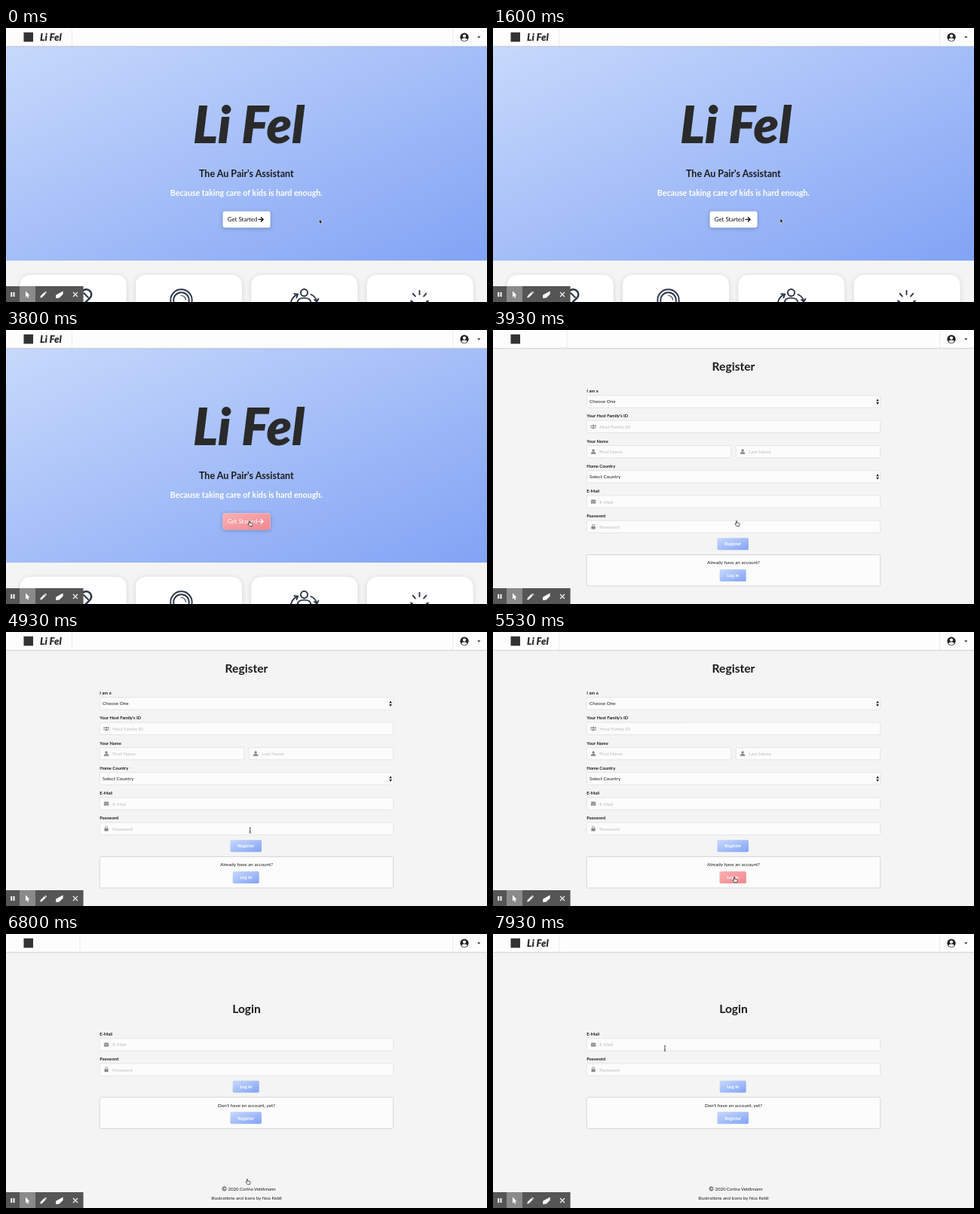
Recreate the animation shown at these times as an HTML page. Size 638 px wide and 364 px high, loop 8 s.

```html
<!DOCTYPE html>
<html lang="en">
<head>
<meta charset="utf-8">
<title>Sign-in walkthrough</title>
<style>
html, body { margin: 0; width: 100%; height: 100%; overflow: hidden; background: #f4f4f4; }
svg { display: block; width: 100%; height: 100%; }
text { font-family: Lato, sans-serif; fill: #1b1c1d; }
.b { font-weight: 700; }
.mid { text-anchor: middle; }
.brand { font-weight: 900; font-style: italic; fill: #2a2a2a; }
.hint { fill: #bcbcbc; }
.white { fill: #fff; }
.field { fill: #fcfcfc; stroke: #dadada; stroke-width: .6; }
.icon { fill: #888; }
.line { fill: none; stroke: #2d3748; stroke-width: 1.9; stroke-linecap: round; stroke-linejoin: round; }
.shadow { filter: drop-shadow(0 1.5px 2.5px #0004); }
.card { filter: drop-shadow(0 1px 3px #0002); }
.edge { filter: drop-shadow(0 .5px 1px #0002); }
</style>
</head>
<body>
<svg id="stage" viewBox="0 0 638 364" preserveAspectRatio="none"></svg>
<script>
const $ = id => document.getElementById(id);
const text = (x, y, size, str, cls = '') =>
  `<text x="${x}" y="${y}" font-size="${size}" class="${cls}">${str}</text>`;
const rect = (x, y, w, h, attrs = '') =>
  `<rect x="${x}" y="${y}" width="${w}" height="${h}" ${attrs}/>`;
const path = (d, attrs = '') => `<path d="${d}" ${attrs}/>`;
const group = (id, body, attrs = '') => `<g ${id && `id="${id}"`} ${attrs}>${body}</g>`;
const gradient = (id, from, to) =>
  `<linearGradient id="${id}" x2="1" y2="1"><stop stop-color="${from}"/><stop offset="1" stop-color="${to}"/></linearGradient>`;

const icons = {
  user: '<circle cy="-1.6" r="1.8"/><path d="M-3.2 3.2V2Q-3 .3-1 .3H1Q3 .3 3.2 2V3.2Z"/>',
  users: '<circle cy="-1.2" r="1.4"/><circle cx="-2.8" cy="-1.2" r="1"/><circle cx="2.8" cy="-1.2" r="1"/>' +
    '<path d="M-2 2.6Q-2 .6 0 .6T2 2.6ZM-4.2 1.8Q-4.2.2-2.2.3L-2.6 1.8ZM4.2 1.8Q4.2.2 2.2.3L2.6 1.8Z"/>',
  mail: '<rect x="-3.2" y="-2.5" width="6.4" height="5" rx=".6"/><path d="M-3.2-1.5 0 .8 3.2-1.5" fill="none" stroke="#fcfcfc" stroke-width=".6"/>',
  lock: '<rect x="-2.6" y="-.6" width="5.2" height="3.8" rx=".5"/><path d="M-1.5-.6V-1.6a1.5 1.5 0 0 1 3 0V-.6" fill="none" stroke="#888" stroke-width=".9"/>'
};

function input(x, y, w, hint, icon) {
  return rect(x, y, w, 16.2, 'rx="1.8" class="field"') +
    `<g class="icon" transform="translate(${x + 8.8} ${y + 8.1})">${icons[icon]}</g>` +
    text(x + 17, y + 10.5, 6.35, hint, 'hint');
}

function select(y, value) {
  return rect(124.3, y, 389.4, 16.2, 'rx="1.8" class="field"') +
    text(128, y + 10.4, 6.35, value) +
    path(`M508.2 ${y + 7.4}l1.9-2.9 1.9 2.9zm0 1.6h3.8l-1.9 2.9z`, 'fill="#222"');
}

const label = (y, str) => text(124.3, y, 5.8, str, 'b');

// A named button also gets a hover layer
function button(y, w, str, id) {
  const box = fill => rect(318.2 - w / 2, y, w, 16, `rx="1.8" fill="url(#${fill})"`);
  return box('blue') + (id ? group(id, box('pink')) : '') +
    text(318.2, y + 10.2, 6, str, 'b mid white');
}

const panel = (y, str) => rect(124.3, y, 389.4, 41.5, 'rx="2" fill="#fcfcfc" stroke="#c9c9ca" stroke-width=".7"') +
  text(319, y + 12.7, 6.3, str, 'mid');

function startButton(fill, color) {
  return rect(287.6, 243.6, 63, 21.7, `rx="3.2" fill="${fill}"`) +
    `<text x="293.8" y="257" font-size="7.85" style="fill:${color}">Get Started</text>` +
    path('M334.6 254.3H341M338 251.2l3.1 3.1-3.1 3.1', `fill="none" stroke="${color}" stroke-width="1.35"`);
}

const hero = rect(0, 24, 638, 285, 'fill="url(#blue)"') +
  text(322, 153, 68, 'Li Fel', 'brand mid') +
  text(318.8, 197.7, 12.5, "The Au Pair's Assistant", 'b mid') +
  text(318.8, 222.6, 10.63, 'Because taking care of kids is hard enough.', 'b mid white') +
  `<g class="shadow">${startButton('#fff', '#111')}${group('start', startButton('url(#pink)', '#fff'))}</g>` +
  [0, 1, 2, 3].map(i => rect(18.7 + 153.3 * i, 328, 141, 60, 'rx="13" fill="#fff" class="card"')).join('') +
  '<g class="line"><path d="M106.5 354 92 368" stroke-width="16"/><path d="M106.5 354 92 368" stroke="#fff" stroke-width="11"/>' +
  '<path d="M103 352 109 358"/>' +
  '<circle cx="232.5" cy="361.5" r="14.2"/><circle cx="232.5" cy="361.5" r="10.3"/><path d="M232.5 355.5a6 6 0 0 1 6 5.5" stroke-width="1.2"/>' +
  '<circle cx="395.5" cy="351.6" r="4.6"/><path d="M386.5 365Q387 358.6 395.5 358.6T404.5 365M378 364Q379.5 357 387 353.6M382.4 353.2l4.8.4-1.8 4.6M404.5 354Q411 357 412.4 363.4M409 361l3.4 2.6 2-3.8"/>' +
  '<path d="M548.5 349v5M539.8 352.8l3 3.6M557.2 352.8l-3 3.6M537 362.6l2 .8M560 362.6l-2 .8"/></g>';

const row = i => 87 + 33.25 * i;
const register = text(319, 53.5, 15.6, 'Register', 'b mid') +
  ['I am a', "Your Host Family's ID", 'Your Name', 'Home Country', 'E-Mail', 'Password']
    .map((str, i) => label(row(i) - 4, str)).join('') +
  select(row(0), 'Choose One') +
  input(124.3, row(1), 389.4, 'Host Family ID', 'users') +
  input(124.3, row(2), 191.4, 'First Name', 'user') +
  input(322.3, row(2), 191.4, 'Last Name', 'user') +
  select(row(3), 'Select Country') +
  input(124.3, row(4), 389.4, 'E-Mail', 'mail') +
  input(124.3, row(5), 389.4, 'Password', 'lock') +
  button(276.2, 41.6, 'Register', 'signUp') +
  panel(298.5, 'Already have an account?') +
  button(318, 35, 'Log In', 'toLogin');

const login = text(319, 105, 15.6, 'Login', 'b mid') +
  label(134.5, 'E-Mail') + input(124.3, 138.8, 389.4, 'E-Mail', 'mail') +
  label(167.7, 'Password') + input(124.3, 172, 389.4, 'Password', 'lock') +
  button(194.7, 35, 'Log In') +
  panel(216.9, "Don't have an account, yet?") +
  button(236.3, 41.6, 'Register') +
  '<circle cx="289.6" cy="338.4" r="2.6" fill="none" stroke="#222" stroke-width=".7"/>' +
  path('M290.8 337.4a1.5 1.5 0 1 0 0 2', 'fill="none" stroke="#222" stroke-width=".7"') +
  text(294.4, 340.6, 6.1, '2020 Corina Veldtmann') +
  text(319, 353.4, 6.1, 'Illustrations and Icons by Noa Kebli', 'mid');

const nav = rect(0, 0, 638, 24, 'fill="#fdfdfd" class="edge"') +
  rect(0, 23.8, 638, .8, 'fill="#cfcfd0"') +
  rect(23.5, 5.8, 12.5, 12.5, 'fill="#333"') +
  group('brand', text(45, 16.6, 13.2, 'Li Fel', 'brand')) +
  rect(0, 0, .7, 24, 'id="divider" fill="#e4e4e5"') + rect(592.3, 0, .7, 24, 'fill="#e4e4e5"') +
  '<circle cx="608" cy="12.2" r="5.6" fill="#222"/><circle cx="608" cy="10.6" r="2.1" fill="#fff"/>' +
  path('M604.2 15.6Q604.8 13.5 606.6 13.5H609.4Q611.2 13.5 611.8 15.6 608 18.8 604.2 15.6Z', 'fill="#fff"') +
  path('M625.2 11.2h4.2l-2.1 2.3z', 'fill="#222"');

const toolbar = rect(0, 343, 102.6, 21, 'fill="#555"') + rect(18, 343, 21, 21, 'fill="#8a8a8a"') +
  '<g fill="#fff"><path d="M6.3 351h1.9v6H6.3zM9.6 351h1.9v6H9.6z"/>' +
  '<path d="M26 349.6v8l1.8-1.6 1.2 2.7 1.3-.6-1.2-2.6 2.4-.2z"/>' +
  '<path d="M45.4 358.4l.4-2.3 5-5 1.9 1.9-5 5zM51.4 350.5l.9-.8 1.9 1.9-.9.9z"/>' +
  '<path d="M66.2 354.8 75.6 349.6V353.8L70.6 358.4 66.2 359Z"/></g>' +
  path('M89 351l6 6m0-6-6 6', 'stroke="#fff" stroke-width="1.1"');

const cursors = {
  arrow: path('M-.4-3.2v6.2l1.4-1.2.9 2 1-.4-.9-2h1.8z', 'fill="#111" stroke="#fff" stroke-width=".5"'),
  hand: path('M-1.6-3.2q.7-.9 1.2 0V-.9l2.8.6q.9.3.7 1.3L2.5 3.6H-1L-2.9.9q-.2-.9.7-.7l.6.6z',
    'fill="#fff" stroke="#222" stroke-width=".7"'),
  beam: path('M-1.2-3.6Q0-3.6 0-2.8 0-3.6 1.2-3.6M0-2.8V2.8M-1.2 3.6Q0 3.6 0 2.8 0 3.6 1.2 3.6M-.7 1h1.4',
    'fill="none" stroke="#333" stroke-width=".8"')
};

$('stage').innerHTML = '<defs>' +
  gradient('blue', '#c7d9fb', '#82a3f5') +
  gradient('pink', '#f9b0b3', '#f4878f') + '</defs>' +
  rect(0, 0, 638, 364, 'fill="#f4f4f4"') +
  group('hero', hero) + group('register', register) + group('login', login) +
  nav + toolbar +
  group('cursor', Object.entries(cursors).map(([id, shape]) => group(id, shape)).join(''));

const LOOP = 8000, TO_REGISTER = 3930, TO_LOGIN = 6800, NAV_LOAD = 130;
const clamp = v => Math.min(1, Math.max(0, v));
const show = (id, on) => $(id).setAttribute('display', on ? 'inline' : 'none');
const between = (v, a, b) => v >= a && v < b;

// Pointer stops: time, x, y, easing into the stop
const smooth = u => u * u * (3 - 2 * u), linear = u => u, easeOut = u => u * (2 - u);
const stops = [
  [0, 416, 257, linear], [1340, 416, 257, linear], [1600, 381.5, 256, smooth], [2200, 324, 257, easeOut],
  [4800, 324, 257, linear], [5500, 321, 329, smooth], [7200, 321, 329, linear], [7900, 228, 152, smooth]
];

// Button, hover start, hover end
const hovers = [['start', 1780, LOOP], ['signUp', 5040, 5150], ['toLogin', 5340, LOOP]];

function pointer(t) {
  const i = stops.findIndex(s => s[0] > t);
  if (i < 0) return stops.at(-1).slice(1, 3);
  const [t0, x0, y0] = stops[i - 1], [t1, x1, y1, ease] = stops[i];
  const u = ease((t - t0) / (t1 - t0));
  return [x0 + (x1 - x0) * u, y0 + (y1 - y0) * u];
}

function pointerKind(t, y) {
  if (t < TO_REGISTER) return t < 1780 ? 'arrow' : 'hand';
  if (t < 4400) return 'hand';
  if (t < TO_LOGIN) {
    if (y < 270) return 'beam';
    return between(y, 276, 292) || y > 318 ? 'hand' : 'arrow';
  }
  if (t < TO_LOGIN + NAV_LOAD) return 'hand';
  return between(y, 172, 188) || y < 155 ? 'beam' : 'arrow';
}

function draw(now) {
  const t = now % LOOP;
  show('hero', t < TO_REGISTER);
  show('register', between(t, TO_REGISTER, TO_LOGIN));
  show('login', t >= TO_LOGIN);

  const loading = [TO_REGISTER, TO_LOGIN].some(s => between(t, s, s + NAV_LOAD));
  show('brand', !loading);
  $('divider').setAttribute('x', loading ? 97.7 : 87.2);

  for (const [id, from, to] of hovers)
    $(id).setAttribute('opacity', clamp((t - from) / 100) - clamp((t - to) / 100));

  const [x, y] = pointer(t), kind = pointerKind(t, y);
  $('cursor').setAttribute('transform', `translate(${x} ${y})`);
  for (const id in cursors) show(id, id === kind);
}

const begin = performance.now();
function tick() {
  draw(performance.now() - begin);
  requestAnimationFrame(tick);
}
tick();
</script>
</body>
</html>
```
